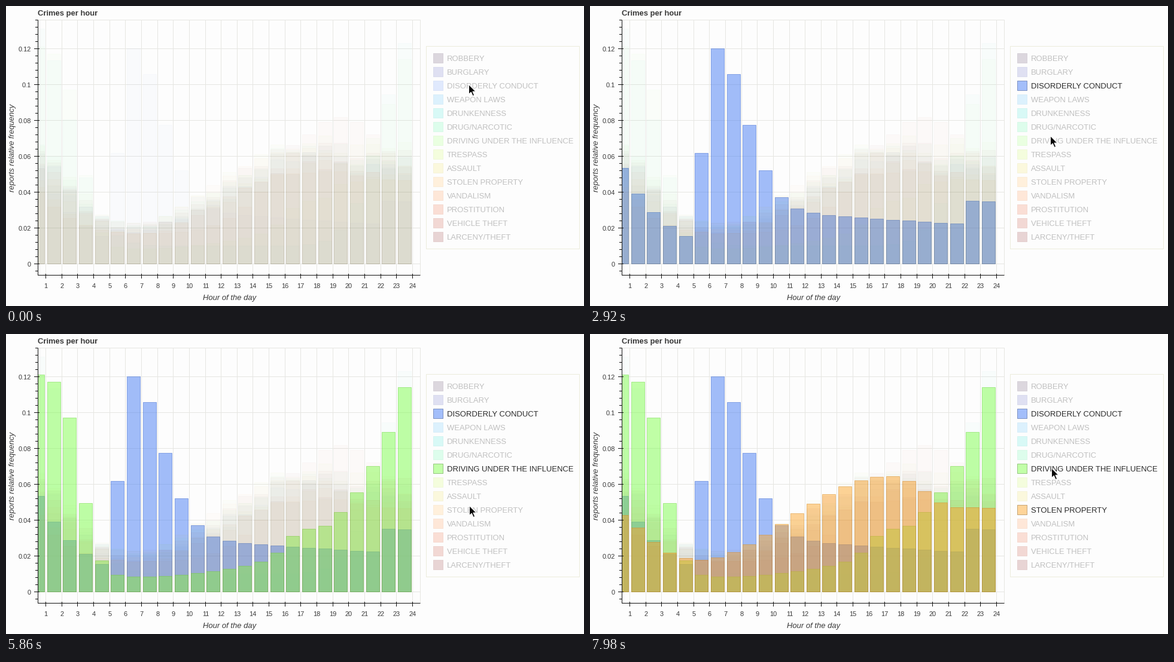
Write a matplotlib script that moves like this. It is 966 by 502 pixels and loops after 8000 ms.

```python
import numpy as np
import matplotlib.pyplot as plt
from matplotlib.animation import FuncAnimation
from matplotlib.collections import LineCollection, PolyCollection
from matplotlib.patches import Polygon, Rectangle

W, H, DPI = 966, 502, 64
STEP, LOOP = 40, 8000
LEFT, RIGHT, TOP, BOTTOM, ZERO = 53.5, 692.5, 23.5, 450.5, 431.5
BACK, INK, GRID, AXIS = "#fdfdfd", "#383838", "#e6e6e2", "#101010"
PALE_INK = "#c0c0c0"

NAMES = ["ROBBERY", "BURGLARY", "DISORDERLY CONDUCT", "WEAPON LAWS",
         "DRUNKENNESS", "DRUG/NARCOTIC", "DRIVING UNDER THE INFLUENCE",
         "TRESPASS", "ASSAULT", "STOLEN PROPERTY", "VANDALISM",
         "PROSTITUTION", "VEHICLE THEFT", "LARCENY/THEFT"]
CONDUCT, DRUNK, DRIVING, STOLEN, VICE = 2, 4, 6, 9, 11

# when each selected category lights up, in ms
LIGHTS = {CONDUCT: 1640, DRIVING: 4160, STOLEN: 6680}

# pointer moves: start, end, from, to
REST = np.array([[773, 131], [769, 217], [774, 287], [771, 224]])
MOVES = [(750, 1700), (3400, 4490), (6500, 7880)]
ARROW = np.array([[0, 0], [0, 16], [3.8, 12.6], [6.6, 19],
                  [9.2, 17.9], [6.4, 11.6], [11.5, 11.6]])

plt.rcParams["path.snap"] = False
fig = plt.figure(figsize=(W / DPI, H / DPI), dpi=DPI, facecolor=BACK)
ax = fig.add_axes([0, 0, 1, 1])
ax.set(xlim=(0, W), ylim=(H, 0))
ax.axis("off")

hour = np.arange(24)
rng = np.random.default_rng(7)
turbo = plt.get_cmap("turbo")(np.arange(14) / 13)[:, :3]


def bell(center, width):
    gap = (hour - center + 12) % 24 - 12
    return np.exp(-gap ** 2 / (2 * width ** 2))


def daily(peak):
    return np.cos(2 * np.pi * (hour - peak) / 24)


def heights(i):
    """Bar heights of category i in pixels."""
    if i == CONDUCT:
        morning = np.clip((hour - 4) / 2, 0, 1)
        day = 98 - 1.5 * hour + 246 * bell(6, 1.8)
        return 160 * np.exp(-.31 * hour) + morning * day + 40 * (hour > 21)
    if i == DRIVING:
        night = 345 / (1 + np.exp((hour - 2.7) / .55))
        evening = 322 * np.exp((hour - 23) / 3.8)
        return 20 + night + evening + 25 * bell(16.4, .8)
    if i == STOLEN:
        extra = 22 * bell(0, 1.5) + 13 * bell(10, 3) - 27 * bell(20.2, 1.4)
        return 122 + 72 * daily(17.2) + extra
    if i == DRUNK:
        return 30 + 365 * bell(23.8, 2.1)
    if i == VICE:
        return 50 + 195 * bell(19, 3.5)
    share = rng.uniform(.72, 1.04) + rng.uniform(-.08, .08, 24)
    return share * (130 + 68 * daily(17.5) + 68 * bell(.5, 2))


def px(size):
    return size * 72 / DPI


def label(x, y, text, size=13, color=INK, ha="left", **kw):
    return ax.text(x, y, text, fontsize=px(size), color=color, ha=ha,
                   family="Liberation Sans", zorder=6, **kw)


def lines(segments, color, z):
    ax.add_collection(LineCollection(segments, colors=color, zorder=z,
                                     linewidths=px(1), capstyle="butt"))


def bars(tops, color, alpha, edge, z):
    quads = []
    for k, h in enumerate(tops):
        x0 = np.floor(42.5 + 26.65 * k) + .5
        x1, y = x0 + 22, ZERO - round(h)
        x0 = max(x0, LEFT)
        quads.append([(x0, ZERO), (x0, y), (x1, y), (x1, ZERO)])
    group = PolyCollection(quads, facecolors=[(*color, alpha)],
                           edgecolors=[(*(color * .85), edge)],
                           linewidths=px(1), zorder=z)
    return ax.add_collection(group)


def draw_axes():
    hours = np.floor(66.5 + 26.65 * hour) + .5
    levels = ZERO - 60 * np.arange(7)
    lines([[(x, TOP), (x, BOTTOM)] for x in hours], GRID, 1)
    lines([[(LEFT, y), (RIGHT, y)] for y in levels], GRID, 1)
    lines([[(LEFT, TOP), (RIGHT, TOP), (RIGHT, BOTTOM)]], GRID, 1)

    lines([[(LEFT, TOP), (LEFT, BOTTOM), (RIGHT, BOTTOM)]], AXIS, 5)
    lines([[(x, 448), (x, 456)] for x in hours], AXIS, 5)
    lines([[(47, y), (56, y)] for y in levels], AXIS, 5)
    minor = ZERO - 12 * np.arange(-1, 35)
    lines([[(49, y), (LEFT, y)] for y in minor], AXIS, 5)

    for n, x in enumerate(hours, 1):
        label(x, 472, str(n), 11, ha="center")
    for n, y in enumerate(levels):
        label(42, y + 4, f"{n * .02:g}", 11, ha="right")
    label(53, 16, "Crimes per hour", weight="bold")
    label(374, 492, "Hour of the day", ha="center", style="italic")
    label(11, 237, "reports relative frequency", ha="center", va="center",
          style="italic", rotation=90)


def draw_legend():
    ax.add_patch(Rectangle((702.5, 67.5), 256, 339, fill=False,
                           ec="#ececdc", lw=px(1)))
    boxes, texts = [], []
    for i, name in enumerate(NAMES):
        y = 87.5 + 23 * i
        box = Rectangle((714.5, y - 8), 16, 16, lw=px(1), zorder=3)
        boxes.append(ax.add_patch(box))
        texts.append(label(737, y + 4.5, name))
    return boxes, texts


muted, lit = {}, {}
for i, tone in enumerate(turbo):
    tops = heights(i)
    muted[i] = bars(tops, tone, .02, .02, 2 + i / 20)
    if i in LIGHTS:
        lit[i] = bars(tops, tone, .5, .5, 2 + i / 20)

draw_axes()
boxes, texts = draw_legend()
pointer = ax.add_patch(Polygon(ARROW, fc="#080808", ec="white",
                               lw=px(1), zorder=9))


def pointer_at(t):
    spot = REST[0].astype(float)
    for (start, end), a, b in zip(MOVES, REST, REST[1:]):
        u = np.clip((t - start) / (end - start), 0, 1)
        spot += (b - a) * u * u * (3 - 2 * u)
    return np.round(spot) + .5


def update(frame):
    t = frame * STEP
    for i, (box, text) in enumerate(zip(boxes, texts)):
        on = i in LIGHTS and t >= LIGHTS[i]
        if i in LIGHTS:
            lit[i].set_visible(on)
            muted[i].set_visible(not on)
        alpha = .5 if on else .17
        color = alpha * turbo[i] + 1 - alpha
        box.set_facecolor(color)
        box.set_edgecolor(color * (.78 if on else .98))
        text.set_color("#282828" if on else PALE_INK)
    pointer.set_xy(ARROW + pointer_at(t))
    return [pointer]


anim = FuncAnimation(fig, update, frames=LOOP // STEP, interval=STEP,
                     init_func=lambda: update(0), repeat=True,
                     repeat_delay=0, blit=False)
plt.show()
```
